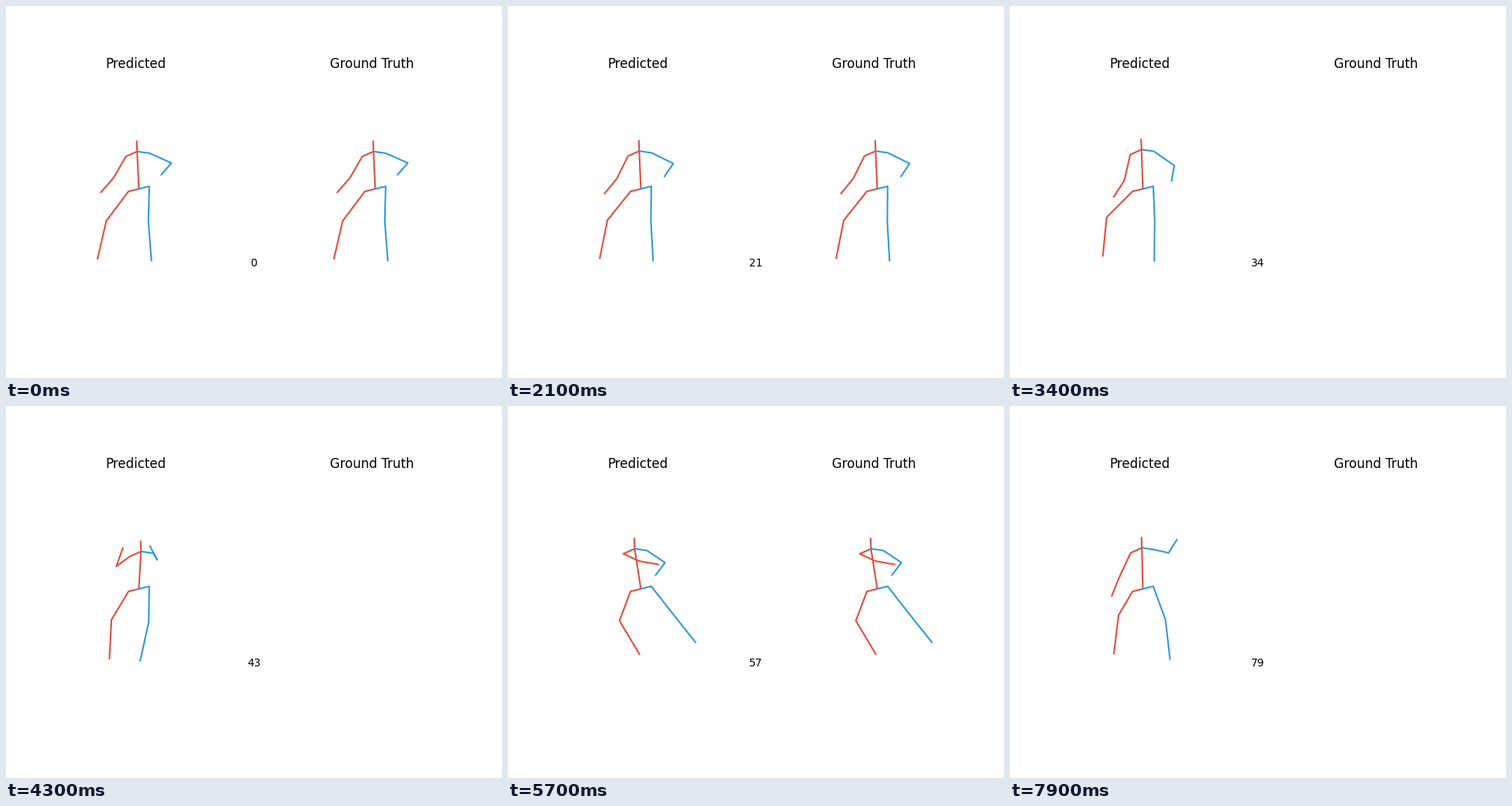
A matplotlib script for the animation above (8 s loop, 640x480 px).

```python
import numpy as np
import matplotlib.pyplot as plt
from matplotlib.animation import FuncAnimation

W, H, DPI = 640, 480, 100
FRAMES, STEP = 80, 100
RED, BLUE = "#e74c3c", "#3498db"
GAP = 305  # distance between the two figures
ROOT = np.array([171.4, 236])
HEAD = (-0.5, -13)  # from the neck

# color, attached to the neck, socket offset, upper and lower bone length
LIMBS = [
    (RED, True, (-14.5, 6.5), 30, 25),
    (BLUE, True, (16, 2.3), 30, 20),
    (RED, False, (-13.3, 3.2), 45, 50),
    (BLUE, False, (13.5, -3.3), 45, 51),
]


def pose(neck, *limbs):
    """Neck offset, then per limb: upper angle, lower angle, foreshortening."""
    return np.array([*neck, *np.ravel(limbs)], float)


def blend(a, b, t):
    return a + (b - a) * t


lean = pose((-2.2, -48.3), (-30, -41, 1.05), (66, -41, 1.03),
            (-37, -13, 1.06), (-1.5, 4.4, 1))
droop = pose((-1.7, -50.8), (-13, -33, 1.15), (55, -10, 1.07),
             (-45, -5.6, 1.05), (2.3, -0.6, 1))
raised = pose((2.8, -48.3), (-54, 160, 0.72), (30, -152, 0.33),
              (-31, -3, 0.95), (-1, -12.4, 1.03))
kick = pose((-8, -51.8), (65, 80, 0.74), (56, -37, 0.93),
            (-20.6, 30.8, 0.9), (38, 38.6, 0.91))
tuck = pose((3.8, -47), (40, 76, 0.44), (-25, -166, 0.5),
            (-25.4, 15.9, 0.71), (26.4, -2.3, 0.95))
stride = pose((-1.2, -53), (-25, -22, 1.18), (77, -212, 0.63),
              (-30.4, -7, 0.79), (20, 6.6, 1.02))

# The first step is quick, and the kick swings a little past its pose.
KEYS = {
    20: lean, 21: blend(lean, droop, 0.22), 34: droop, 43: raised,
    59: blend(raised, kick, 16 / 14), 68: tuck, 79: stride,
}
TIMES = list(KEYS)


def pose_at(i):
    i = i + 20 if i < 20 else i  # the opening clip is played twice
    k = min(np.searchsorted(TIMES, i, side="right") - 1, len(TIMES) - 2)
    a, b = TIMES[k:k + 2]
    return blend(KEYS[a], KEYS[b], (i - a) / (b - a))


def truth_shown(i):
    return any(start <= i < start + 10 for start in (0, 20, 50))


def ray(angle, length):
    a = np.radians(angle)  # 0 points down, positive turns right
    return length * np.array([np.sin(a), np.cos(a)])


def chains(p):
    """Joint positions of the spine and the four limbs."""
    neck = ROOT + p[:2]
    yield [ROOT, neck, neck + HEAD]
    for limb, angles in zip(LIMBS, p[2:].reshape(4, 3)):
        _, on_neck, offset, upper, lower = limb
        first, second, short = angles
        base = neck if on_neck else ROOT
        socket = base + offset
        middle = socket + ray(first, upper * short)
        yield [base, socket, middle, middle + ray(second, lower)]


fig = plt.figure(figsize=(W / DPI, H / DPI), dpi=DPI, facecolor="white")
plt.rcParams["font.family"] = "DejaVu Sans"
ax = fig.add_axes([0, 0, 1, 1], xlim=(0, W), ylim=(H, 0))
ax.axis("off")

ax.text(167.5, 80, "Predicted", size=12, ha="center")
ax.text(167.5 + GAP, 80, "Ground Truth", size=12, ha="center")
counter = ax.text(W / 2, 336, "0", size=10, ha="center")


def skeleton():
    colors = [RED] + [limb[0] for limb in LIMBS]
    return [ax.plot([], [], color=c, lw=1.5, solid_capstyle="projecting",
                    solid_joinstyle="round")[0] for c in colors]


predicted, truth = skeleton(), skeleton()


def draw(i):
    for left, right, points in zip(predicted, truth, chains(pose_at(i))):
        x, y = np.transpose(points)
        left.set_data(x, y)
        right.set_data(x + GAP, y)
        right.set_visible(truth_shown(i))
    counter.set_text(str(i))
    return [counter, *predicted, *truth]


anim = FuncAnimation(fig, draw, frames=FRAMES, interval=STEP,
                     repeat=True, repeat_delay=0, blit=False)
plt.show()
```
